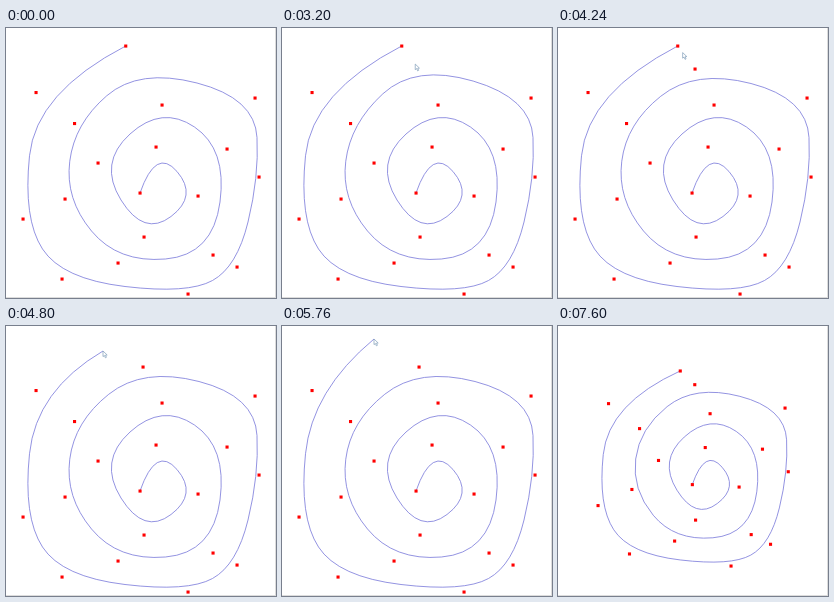
Write an HTML page with a canvas that moves like this. It is 270 px wide and 270 px high and loops after 8 s.

```html
<!DOCTYPE html>
<html lang="en">
<head>
<meta charset="utf-8">
<title>Spline editor</title>
<style>
  html, body { margin: 0; width: 100%; height: 100%; overflow: hidden; background: #fff; }
  canvas { display: block; width: 100vw; height: 100vh; }
</style>
</head>
<body>
<canvas id="stage" width="270" height="270"></canvas>
<script>
const ctx = document.getElementById('stage').getContext('2d');
const LOOP = 8000, STEP = 80, ZOOM_AT = 7600;

// Control points of the spiral; the top and tail points follow the pointer.
const inner = [
  [134, 165], [150, 119], [192, 168], [138, 209], [92, 135], [156, 77],
  [221, 121], [207, 227], [112, 235], [59, 171], [68.5, 95.5]
];
const outer = [
  [249, 70], [253, 149], [231, 239], [182, 266], [56, 251], [17, 191], [30, 64.5]
];

// Times at which the pointer holds each point.
const ADD = { from: 1280, to: 1600, undo: 2240 };
const TOP = { from: 3160, to: 3840 };
const TAIL = { from: 4400, to: 6160 };
const POINTER_GONE = 7040;

// Pointer stops: [time, x, y].
const stops = [
  [ADD.from, 128, 22], [ADD.to, 134, 41], [1840, 131.5, 39.5],
  [TOP.from, 133, 40], [TOP.to, 137, 41],
  [TAIL.from, 119.7, 18], [4800, 97, 25], [5280, 86, 20], [5760, 92, 13], [TAIL.to, 119, 24]
];

const clamp = (v, lo, hi) => Math.min(hi, Math.max(lo, v));
const lerp = (a, b, k) => a + (b - a) * k;

function pointer(t) {
  const i = clamp(stops.findIndex(s => t < s[0]), 1, stops.length);
  const [t0, x0, y0] = stops[i - 1], [t1, x1, y1] = stops[i] || stops[i - 1];
  const k = t1 > t0 ? clamp((t - t0) / (t1 - t0), 0, 1) : 0;
  // The top point is swung up, then down, before it is let go.
  const swing = t0 === TOP.from ? -11 * Math.sin(2 * Math.PI * k) : 0;
  return [lerp(x0, x1, k), lerp(y0, y1, k) + swing];
}

function lastPointer(t) {
  return t >= TAIL.to ? stops[stops.length - 1].slice(1) : pointer(t);
}

const held = (t, grab) => lastPointer(clamp(t, grab.from, grab.to));

// Clamped quadratic B-spline: joints lie midway between control points.
function drawSpline(pts) {
  const last = pts.length - 1;
  ctx.beginPath();
  ctx.moveTo(...pts[0]);
  for (let i = 1; i < last; i++) {
    const [x, y] = pts[i], [nx, ny] = pts[i + 1];
    const k = i === last - 1 ? 1 : 0.5;
    ctx.quadraticCurveTo(x, y, lerp(x, nx, k), lerp(y, ny, k));
  }
  ctx.strokeStyle = '#8080dc';
  ctx.lineWidth = 0.85;
  ctx.stroke();
}

function drawMarker([x, y]) {
  ctx.fillStyle = '#f00';
  ctx.fillRect(x - 1.5, y - 1.5, 3.1, 3.1);
}

function drawCursor([x, y]) {
  ctx.save();
  ctx.translate(x, y);
  const arrow = new Path2D('M0 0V5.6L1.4 4.5L2.4 6.8L3.4 6.3L2.5 4.1L4.2 4Z');
  ctx.fillStyle = '#fff';
  ctx.fill(arrow);
  ctx.strokeStyle = '#7f9cb8';
  ctx.lineWidth = 0.7;
  ctx.stroke(arrow);
  ctx.restore();
}

function render(time) {
  const t = Math.floor(time / STEP) * STEP;
  const top = held(t, TOP), tail = held(t, TAIL), extra = held(t, ADD);
  const adding = t >= ADD.from && t < ADD.undo;

  const pts = [...inner, top, ...outer, tail];
  const marks = [...inner, ...outer];
  if (adding) pts.unshift(extra);
  // A point shows its marker again only once it is released.
  if (adding && t > ADD.to) marks.push(extra);
  if (t > TOP.to) marks.push(top);
  if (t < TAIL.from || t >= TAIL.to + 3 * STEP) marks.push(tail);

  const place = ([x, y]) => t < ZOOM_AT ? [x, y] : [26.3 + x * 0.806, 25.6 + y * 0.806];

  ctx.fillStyle = '#dcdcdc';
  ctx.fillRect(0, 0, 270, 270);
  ctx.fillStyle = '#fff';
  ctx.fillRect(0, 0, 269, 269);

  drawSpline(pts.map(place));
  marks.map(place).forEach(drawMarker);
  if (t >= ADD.from && t < POINTER_GONE) drawCursor(lastPointer(t));
}

const start = performance.now();
function tick() {
  render((performance.now() - start) % LOOP);
  requestAnimationFrame(tick);
}
tick();
</script>
</body>
</html>
```
